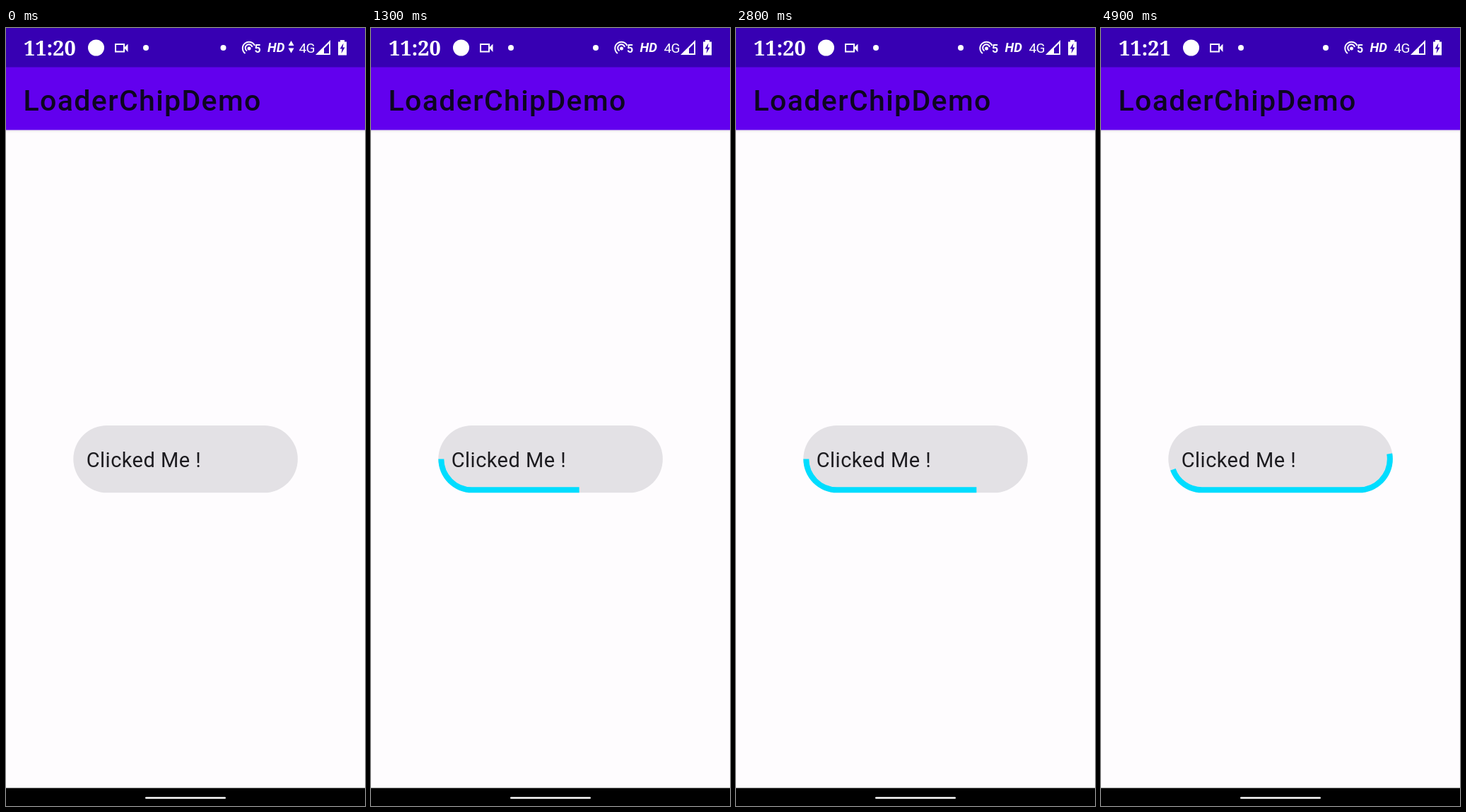
Animation, 508 px wide and 1102 px high, one loop 5000 ms. Source, as an HTML page:

```html
<!DOCTYPE html>
<html lang="en">
<head>
<meta charset="utf-8">
<title>Loader chip</title>
<style>
  html, body { margin: 0; width: 100%; height: 100%; overflow: hidden; background: #fefcfe; }
  svg { display: block; width: 100%; height: 100%; }
  text { font-family: Roboto, sans-serif; }
  .clock { font: 700 29px "Noto Serif", serif; }
  .title { font-size: 41px; font-weight: 500; letter-spacing: 1.35px; }
  .label { font-size: 29px; letter-spacing: .45px; }
  .net { font-size: 19px; letter-spacing: -.8px; }
  .hd { font-size: 18.5px; font-weight: 700; font-style: italic; }
  .gen { font-size: 16px; font-weight: 700; }
  .line { fill: none; stroke: #fff; stroke-width: 2; }
</style>
</head>
<body>
<svg viewBox="0 0 508 1102" preserveAspectRatio="none">
  <defs>
    <path id="pill" d="M95.3 610.6A47.7 47.7 0 0 1 143 562.9H365.2A47.7 47.7 0 0 1 365.2 658.3H143A47.7 47.7 0 0 1 95.3 610.6Z"/>
    <clipPath id="inside"><use href="#pill"/></clipPath>
    <linearGradient id="shade" x2="0" y2="1">
      <stop stop-color="#000" stop-opacity=".08"/>
      <stop offset="1" stop-color="#000" stop-opacity="0"/>
    </linearGradient>
  </defs>

  <rect width="508" height="1102" fill="#fefcfe"/>
  <rect y="144.500" width="508" height="4" fill="url(#shade)"/>
  <rect y="55" width="508" height="89.500" fill="#6200ee"/>
  <rect width="508" height="55.500" fill="#3700b3"/>
  <text class="title" x="24.500" y="116.500" fill="#0d0620">LoaderChipDemo</text>

  <g fill="#fff">
    <text id="clock" class="clock" x="25" y="39">11:20</text>
    <circle cx="127.500" cy="28" r="11.500"/>
    <rect class="line" x="155" y="23" width="12" height="10.500"/>
    <path d="M167 28L172.500 22.500V34Z"/>
    <circle cx="198" cy="28" r="4"/>

    <g id="shifted">
      <circle cx="307.500" cy="28" r="4"/>
      <path class="line" d="M338.500 36A9 9 0 1 1 352 25M341 32.500A5 5 0 1 1 348.500 27"/>
      <circle cx="344" cy="29" r="2.500"/>
      <text class="gen" x="351.500" y="35">5</text>
      <text class="hd" x="370" y="34">HD</text>
    </g>
    <path id="arrows" d="M399.500 25L403.500 18L407.500 25ZM399.500 28.500H407.500L403.500 35.500Z"/>

    <text class="net" x="414.500" y="34.500">4G</text>
    <path d="M438 38L459 17V38ZM450 29V36H457V22Z" fill-rule="evenodd"/>
    <path d="M473 17H479V19.500H482V38.500H470V19.500H473Z"/>
    <path d="M477.500 21.500L472.500 29.500H475.500L474.500 36L479.500 27.500H476.500Z" fill="#3700b3"/>
  </g>

  <use href="#pill" fill="#e3e1e5"/>
  <g clip-path="url(#inside)">
    <path id="loader" pathLength="1" fill="none" stroke="#00ddff" stroke-width="16"/>
  </g>
  <text class="label" x="113.800" y="621.500" fill="#1c1b1f">Clicked Me !</text>

  <rect y="1076.500" width="508" height="25.500" fill="#000"/>
  <rect x="197" y="1089.200" width="114" height="2.600" rx="1.300" fill="#fff"/>
</svg>
<script>
  const LOOP = 5000, STEP = 100, CLICK = 400;
  // time in ms, turns made by the loader
  const turns = [[350, 0], [900, .407], [1800, 1.056], [2800, 1.634],
                 [3400, 2.301], [4300, 3.051], [4900, 3.489]];
  const $ = id => document.getElementById(id);
  const clock = $("clock"), shifted = $("shifted"), arrows = $("arrows"), loader = $("loader");
  loader.setAttribute("d", $("pill").getAttribute("d"));

  function turnAt(t) {
    let i = 1;
    while (i < turns.length - 1 && t > turns[i][0]) i++;
    const [t0, a] = turns[i - 1], [t1, b] = turns[i];
    return a + (b - a) * (t - t0) / (t1 - t0);
  }

  function draw(now) {
    const t = Math.floor(now % LOOP / STEP) * STEP;
    const busy = t >= CLICK;
    const data = t < 500;

    clock.textContent = t < 4600 ? "11:20" : "11:21";
    shifted.setAttribute("transform", `translate(${data ? 0 : 10.5} 0)`);
    arrows.style.display = data ? "" : "none";

    // The head runs at twice the tail's speed and waits at the path's end.
    loader.style.display = busy ? "" : "none";
    if (busy) {
      const tail = turnAt(t) % 1;
      const head = Math.min(1, tail * 2);
      loader.setAttribute("stroke-dasharray", `0 ${tail} ${head - tail} 2`);
    }
  }

  const start = performance.now();
  function tick() {
    draw(performance.now() - start);
    requestAnimationFrame(tick);
  }
  tick();
</script>
</body>
</html>
```
